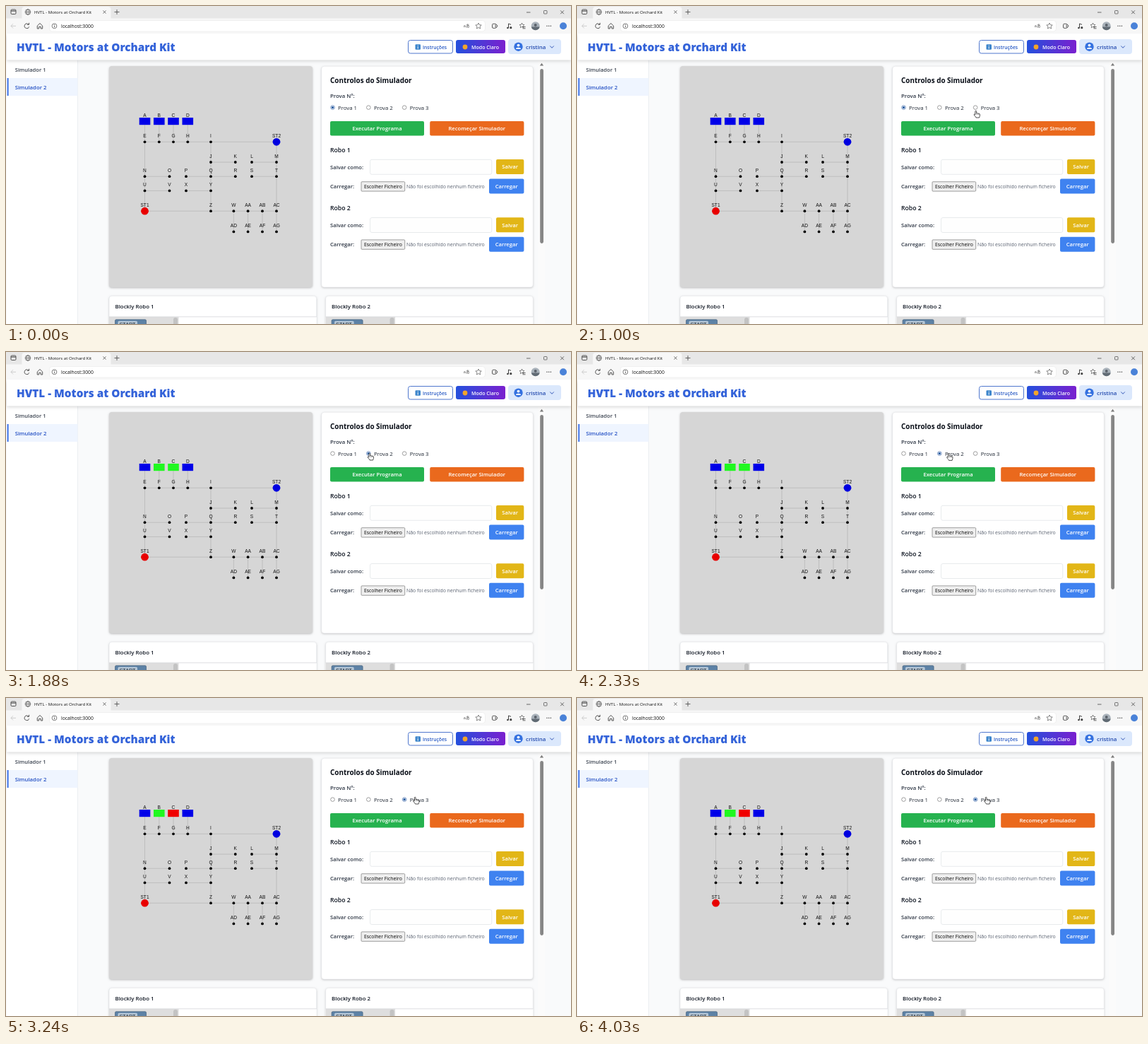
An HTML page with a canvas for the animation above (4.06 s loop, 800 px wide and 450 px high).

```html
<!DOCTYPE html>
<html lang="pt">
<head>
<meta charset="utf-8">
<title>Simulador</title>
<style>
html, body { margin: 0; width: 100%; height: 100%; overflow: hidden; background: #f9fafb; }
canvas { display: block; width: 800px; height: 450px; }
</style>
</head>
<body>
<canvas id="stage"></canvas>
<script>
const LOOP = 4060;
const SANS = '"Open Sans", "Noto Sans", sans-serif';
const ARIAL = '"Liberation Sans", Arial, sans-serif';
const APP = 'HVTL - Motors at Orchard Kit';
const USER = 'cristina';
const canvas = document.getElementById('stage');
const ctx = canvas.getContext('2d');
const dpr = window.devicePixelRatio || 1;
canvas.width = 800 * dpr;
canvas.height = 450 * dpr;

function rect(x, y, w, h, fill, r = 0, border, lw = 0.7) {
  ctx.beginPath();
  ctx.roundRect(x, y, w, h, r);
  if (fill) { ctx.fillStyle = fill; ctx.fill(); }
  if (border) { ctx.strokeStyle = border; ctx.lineWidth = lw; ctx.stroke(); }
}

function shadowed(blur, dy, alpha, draw) {
  ctx.save();
  ctx.shadowColor = `rgba(0,0,0,${alpha})`;
  ctx.shadowBlur = blur * dpr;
  ctx.shadowOffsetY = dy * dpr;
  draw();
  ctx.restore();
}

function circle(x, y, r, fill, border, lw = 0.7) {
  ctx.beginPath();
  ctx.arc(x, y, r, 0, Math.PI * 2);
  if (fill) { ctx.fillStyle = fill; ctx.fill(); }
  if (border) { ctx.strokeStyle = border; ctx.lineWidth = lw; ctx.stroke(); }
}

// points: flat list x, y, x, y ...
function line(points, color, lw = 0.8) {
  ctx.beginPath();
  for (let i = 0; i < points.length; i += 2) ctx.lineTo(points[i], points[i + 1]);
  ctx.strokeStyle = color;
  ctx.lineWidth = lw;
  ctx.stroke();
}

// y is the middle of the capital letters
function text(s, x, y, size, color, weight = 400, align = 'left', family = SANS) {
  ctx.font = `${weight} ${size}px ${family}`;
  ctx.textAlign = align;
  ctx.fillStyle = color;
  ctx.fillText(s, x, y + size * 0.357);
}

function cross(x, y, r, color) {
  line([x - r, y - r, x + r, y + r], color);
  line([x + r, y - r, x - r, y + r], color);
}

function star(x, y, r) {
  const pts = [];
  for (let i = 0; i <= 10; i++) {
    const a = i * Math.PI / 5 - Math.PI / 2, d = i % 2 ? r * 0.48 : r;
    pts.push(x + d * Math.cos(a), y + d * Math.sin(a));
  }
  line(pts, '#555', 0.7);
}

function drawBrowser() {
  const ink = '#444';
  rect(0, 0, 800, 18, '#e7e7e7');
  rect(0, 17.5, 800, 21, '#f7f7f7');
  rect(22.5, 1, 126, 18, '#f7f7f7', [4, 4, 0, 0]);
  rect(7, 5, 7, 6.5, null, 1.3, ink, 0.9);
  line([7, 7, 14, 7], ink, 1.1);

  circle(31, 8.5, 3.8, null, ink);
  ctx.beginPath();
  ctx.ellipse(31, 8.5, 1.7, 3.8, 0, 0, 7);
  ctx.stroke();
  line([27.2, 8.5, 34.8, 8.5], ink, 0.6);
  text(APP, 40, 8.5, 6.1, '#111');
  cross(139.5, 8.5, 2, ink);
  line([153.5, 8.5, 160.5, 8.5], ink);
  line([157, 5, 157, 12], ink);

  line([737, 9, 742.5, 9], ink);
  rect(761.5, 6.5, 4.5, 4.5, null, 0.8, ink);
  cross(787.5, 8.8, 2.4, ink);

  // navigation
  line([14, 28.3, 7, 28.3], '#c5c5c5');
  line([10, 25.2, 7, 28.3, 10, 31.4], '#c5c5c5');
  ctx.beginPath();
  ctx.arc(29.5, 28.3, 3.3, 0.3, 5.6);
  ctx.strokeStyle = ink;
  ctx.lineWidth = 0.9;
  ctx.stroke();
  line([30, 26.3, 32.6, 26.3, 32.6, 23.8], ink, 0.9);
  line([44.3, 28, 48, 24.5, 51.7, 28, 51.7, 32, 49.3, 32, 49.3, 29.3, 46.7, 29.3, 46.7, 32, 44.3, 32, 44.3, 28], ink, 0.9);

  rect(61.5, 20.5, 617, 15.5, '#fff', 4, '#e8e8e8', 0.6);
  circle(68.5, 28.3, 3.4, null, ink);
  line([68.5, 27.8, 68.5, 30.2], ink);
  circle(68.5, 26.4, 0.5, ink);
  text('localhost:3000', 78, 28.3, 6.8, '#111');
  text('aあ', 647.5, 28, 6, '#555', 400, 'left', '"Open Sans", "Noto Sans CJK JP", "Noto Sans CJK", sans-serif');
  star(669, 28.4, 4.4);

  // toolbar icons
  rect(688.5, 25.3, 5.6, 6, null, 1.3, ink, 0.9);
  circle(694.3, 28.3, 1.5, '#f7f7f7', ink, 0.9);
  line([711.5, 31, 711.5, 25, 715, 26.3], ink, 1);
  circle(710.4, 31, 1.3, ink);
  circle(714.8, 30.7, 1.6, ink);
  star(730.5, 27.7, 3.7);
  line([731, 29.5, 735.5, 29.5], ink, 0.9);
  line([731.5, 31.8, 735.5, 31.8], ink, 0.9);
  circle(749.7, 28.3, 6, '#a9b2ba');
  ctx.save();
  ctx.clip();
  rect(743, 29.5, 14, 6, '#616b74');
  circle(749.7, 27, 2, '#5b626b');
  ctx.restore();
  for (const x of [766, 768.7, 771.4]) circle(x, 28.3, 0.75, ink);
  circle(789, 28.3, 5, '#4a82d8');
}

function drawHeader() {
  shadowed(5, 1.5, 0.18, () => rect(1, 39, 799, 37.5, '#fff'));
  text(APP, 15, 58.7, 15.3, '#3463d9', 800);

  rect(569.5, 48.5, 63, 18.5, '#fff', 3, '#3c68c9', 0.9);
  rect(579.5, 54.3, 7.5, 7.5, '#3e86cc', 1.2);
  line([583.2, 57.5, 583.2, 60.5], '#fff', 1);
  circle(583.2, 56.1, 0.6, '#fff');
  text('Instruções', 590, 58.2, 6.75, '#2759c4', 600);

  const g = ctx.createLinearGradient(637, 0, 707, 0);
  g.addColorStop(0, '#2450dc');
  g.addColorStop(1, '#7a20cf');
  rect(637, 48, 70, 19, g, 3);
  circle(650, 58, 3.4, '#f2a52b');
  text('Modo Claro', 659, 58.2, 7.05, '#fff', 600);

  rect(711, 47, 75, 21, '#dbe8fc', 4);
  circle(725.5, 57.7, 6.2, '#3471e0');
  circle(725.5, 55.6, 1.9, '#fff');
  ctx.beginPath();
  ctx.ellipse(725.5, 61, 3.5, 2.3, 0, Math.PI, 0);
  ctx.fill();
  text(USER, 736, 58, 7.9, '#2148ae', 600);
  line([770.3, 56.5, 773, 59.3, 775.7, 56.5], '#2148ae', 0.9);
}

function drawSidebar() {
  rect(1, 76.5, 100.5, 374, '#fff');
  line([101.5, 76.5, 101.5, 450], '#e5e7eb', 0.7);
  text('Simulador 1', 12.7, 90, 7.6, '#3b4350', 600);
  rect(2, 102, 99.5, 25, '#eff5ff');
  rect(1.6, 102, 2, 25, '#3b70e6');
  text('Simulador 2', 12.7, 114.8, 7.75, '#2450c4', 600);
}

const BLUE = '#0000e8', GREEN = '#20f820', RED = '#f00000';
const SLOTS = [196.5, 216.8, 237, 257.3];
const COLORS = [
  [BLUE, BLUE, BLUE, BLUE],
  [BLUE, GREEN, GREEN, BLUE],
  [BLUE, GREEN, RED, BLUE]
];
const ROWS = [
  [192.3, 'E F G H I ST2', [...SLOTS, 290, 383]],
  [221, 'J K L M', [290, 324.8, 348, 383]],
  [241.2, 'N O P Q R S T', [196.5, 231.5, 255, 290, 324.8, 348, 383]],
  [261.4, 'U V X Y', [196.5, 231.5, 255, 290]],
  [290.2, 'ST1 Z W AA AB AC', [196.5, 290, 322.4, 342.6, 363, 383]],
  [319.4, 'AD AE AF AG', [322.4, 342.6, 363, 383]]
];

function drawMap(test) {
  shadowed(3, 1, 0.25, () => rect(146, 85, 288, 313, '#d6d6d6', 4));
  const h = (y, a, b) => line([a, y, b, y], '#adadad', 0.6);
  const v = (x, a, b) => line([x, a, x, b], '#adadad', 0.6);
  h(192.3, 196.5, 383);
  h(221, 290, 324.8);
  h(221, 348, 383);
  h(241.2, 196.5, 231.5);
  h(241.2, 255, 324.8);
  h(241.2, 348, 383);
  h(261.4, 196.5, 231.5);
  h(261.4, 255, 290);
  h(290.2, 196.5, 383);
  SLOTS.forEach(x => v(x, 163, 192.3));
  v(196.5, 192.3, 290.2);
  v(290, 192.3, 290.2);
  v(383, 192.3, 290.2);
  ROWS[5][2].forEach(x => v(x, 290.2, 319.4));

  SLOTS.forEach((x, i) => {
    rect(x - 7.8, 158, 15.6, 10.2, COLORS[test][i]);
    text('ABCD'[i], x, 154.3, 6.6, '#111', 400, 'center', ARIAL);
  });
  for (const [y, names, xs] of ROWS) {
    names.split(' ').forEach((name, i) => {
      if (name === 'ST2') circle(xs[i], y, 5.4, '#0000e0');
      else if (name === 'ST1') circle(xs[i], y, 5.4, '#e80000');
      else circle(xs[i], y, 1.9, '#000');
      text(name, xs[i], y - 8.8, 6.6, '#111', 400, 'center', ARIAL);
    });
  }
}

function button(label, x, y, w, h, fill) {
  rect(x, y, w, h, fill, 2);
  text(label, x + w / 2, y + h / 2 + 0.2, 7.65, '#fff', 600, 'center');
}

function drawRobot(n, dy) {
  const ink = '#2d3644';
  text('Robo ' + n, 459, 203.7 + dy, 8.7, '#111824', 600);
  text('Salvar como:', 459, 228 + dy, 7.65, ink, 600);
  rect(515.5, 217.3 + dy, 172.3, 21, '#fefefe', 2.5, '#dfe2e6');
  button('Salvar', 694, 217 + dy, 39.3, 21, '#e2b617');
  text('Carregar:', 459, 255.4 + dy, 7.65, ink, 600);
  rect(503, 248.7 + dy, 61.7, 13.4, '#efefef', 1, '#777');
  text('Escolher Ficheiro', 533.9, 255.6 + dy, 6.85, '#000', 400, 'center');
  text('Não foi escolhido nenhum ficheiro', 567, 255.4 + dy, 6.92, '#596170');
  button('Carregar', 684, 244.6 + dy, 49.4, 20.9, '#3f82f0');
}

function drawControls(test) {
  shadowed(3, 1, 0.22, () => rect(446.7, 85.2, 299.6, 312.8, '#fff', 4));
  rect(446.7, 85.2, 299.6, 312.8, null, 4, '#e3e5e8', 0.6);
  text('Controlos do Simulador', 459, 105.7, 9.9, '#0a0f18', 700);
  text('Prova Nº:', 459, 127.6, 7.8, '#2d3644', 600);
  for (let i = 0; i < 3; i++) {
    const x = 462.5 + i * 50.8, on = i === test;
    circle(x, 143.6, 2.8, '#fff', on ? '#3a65a8' : '#777', 0.7);
    if (on) circle(x, 143.6, 1.7, '#245a9f');
    text('Prova ' + (i + 1), x + 7.6, 144.2, 7.75, '#1f2733');
  }
  button('Executar Programa', 459, 163, 133, 20.4, '#26b24f');
  button('Recomeçar Simulador', 600.2, 163, 133.2, 20.4, '#ea691d');
  drawRobot(1, 0);
  drawRobot(2, 82.2);
}

function drawBlockly(n, x) {
  shadowed(3, 1, 0.22, () => rect(x, 410.2, 293.7, 50, '#fff', 4));
  rect(x, 410.2, 293.7, 50, null, 4, '#e3e5e8', 0.6);
  text('Blockly Robo ' + n, x + 8.5, 425.5, 7.85, '#111824', 600);
  rect(x, 440, 293.7, 12, '#fff');
  rect(x, 440, 98.5, 12, '#dedede');
  line([x, 439.8, x + 293.7, 439.8], '#cfd2d6', 0.7);
  rect(x + 91, 441, 6, 12, '#c3c3c3', 2.5);
  rect(x + 8.5, 443.8, 44, 10, '#5d82a6', 1.5, '#46617c', 0.7);
  rect(x + 12.5, 445.8, 27.5, 10, '#b7c8d8', 1.5);
  text('START', x + 14.5, 450.4, 7.2, '#14202c', 400, 'left', ARIAL);
}

function drawScrollbar() {
  rect(753.5, 77, 9.5, 373, '#fbfbfb');
  ctx.beginPath();
  ctx.moveTo(755.8, 84.5);
  ctx.lineTo(758.5, 80.8);
  ctx.lineTo(761.2, 84.5);
  ctx.fillStyle = '#7d7d7d';
  ctx.fill();
  rect(756.2, 89, 4.8, 247, '#868686', 2.4);
}

// time, x, y of the pointer tip
const PATH = [
  [620, 618, 205], [900, 566, 149.5], [1000, 564.8, 148.3], [1100, 564.8, 148.3],
  [1400, 518, 144], [1450, 517.3, 143.8], [1700, 514, 143.3], [1950, 515, 143.3],
  [2300, 526.3, 143.7], [2550, 526.6, 143.7], [2800, 565, 142], [2950, 566, 142],
  [3200, 579.3, 140.3]
];

function pointerAt(t) {
  if (t < PATH[0][0]) return null;
  const i = PATH.findIndex(p => p[0] > t);
  if (i < 0) return PATH[PATH.length - 1].slice(1);
  const [t0, x0, y0] = PATH[i - 1], [t1, x1, y1] = PATH[i];
  const u = (t - t0) / (t1 - t0), e = u * u * (3 - 2 * u);
  return [x0 + (x1 - x0) * e, y0 + (y1 - y0) * e];
}

const HAND = new Path2D('M-1 .8C-1-.3.8-.3.8.8V3.6C1.1 3 2.4 3 2.5 3.9C2.9 3.3 4 3.4 4.1 4.3C4.6 3.8 5.6 4.1 5.6 5V6.9C5.6 8 4.9 8.5 4.8 9.7H.2C0 8.4-1.8 7.3-2.6 5.7C-3 4.9-2 4.3-1 5.5Z');
const ARROW = new Path2D('M0 0V8.6L2 6.8L3.3 9.8L4.6 9.2L3.4 6.3H6.1Z');

function drawPointer(t) {
  const p = pointerAt(t);
  if (!p) return;
  const [x, y] = p;
  const clickable = y < 152 || (y > 163 && y < 183.5);
  const shape = clickable ? HAND : ARROW;
  ctx.save();
  ctx.translate(x, y);
  ctx.fillStyle = '#fff';
  ctx.fill(shape);
  ctx.strokeStyle = '#222';
  ctx.lineWidth = 0.8;
  ctx.lineJoin = 'round';
  ctx.stroke(shape);
  if (clickable) {
    for (const dx of [0.9, 2.5, 4.1]) line([dx, 4.2, dx, 5.7], '#333', 0.5);
  }
  ctx.restore();
}

function draw(t) {
  const test = t < 1850 ? 0 : t < 2900 ? 1 : 2;
  ctx.setTransform(dpr, 0, 0, dpr, 0, 0);
  rect(0, 0, 800, 450, '#f9fafb');
  drawSidebar();
  drawScrollbar();
  drawHeader();
  drawBrowser();
  drawMap(test);
  drawControls(test);
  drawBlockly(1, 146);
  drawBlockly(2, 452.6);
  drawPointer(t);
}

const start = performance.now();
function tick() {
  draw((performance.now() - start) % LOOP);
  requestAnimationFrame(tick);
}
tick();
</script>
</body>
</html>
```
